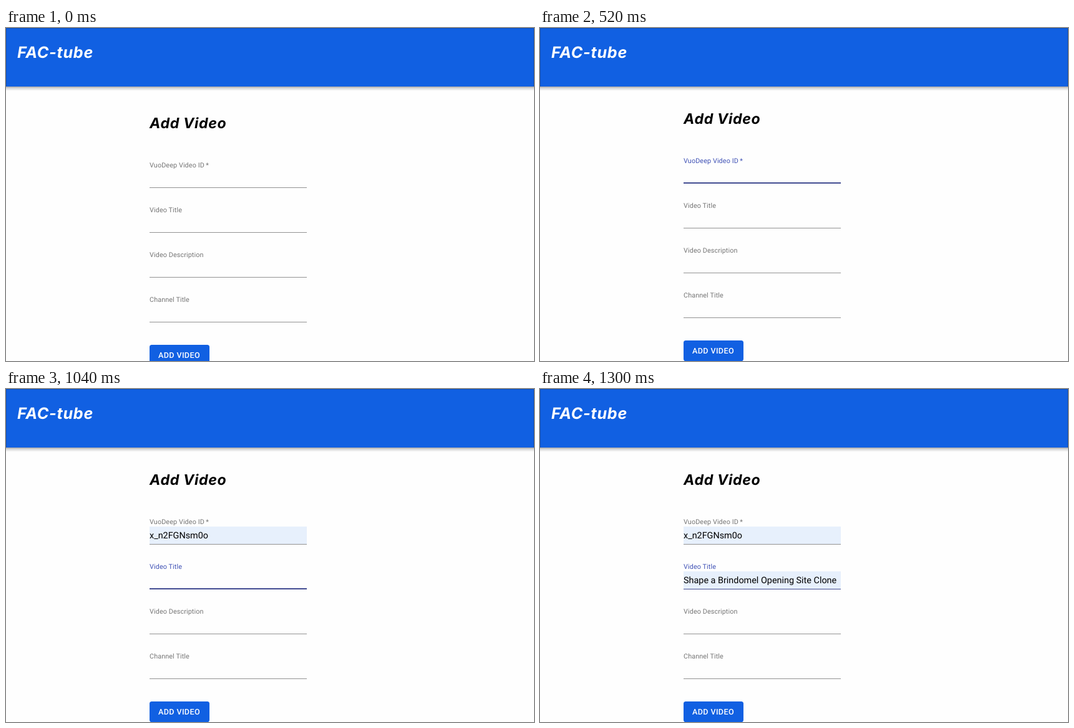
These frames come from a looping animation (846x535 px, 1.56 s). An HTML page:

```html
<!DOCTYPE html>
<html lang="en">
<head>
<meta charset="utf-8">
<title>Add Video</title>
<style>
  html, body { margin: 0; width: 100%; height: 100%; overflow: hidden; background: #fefefe; }
  svg { display: block; width: 846px; height: 535px; }
  text { font-family: Roboto, Arial, sans-serif; text-rendering: geometricPrecision; white-space: pre; }
  .heading { font-family: Montserrat, Inter, sans-serif; font-weight: 700; font-style: italic; }
  .label { font-size: 10.8px; letter-spacing: .1px; }
  .value { font-size: 14.4px; }
  .button { font-size: 12.6px; font-weight: 500; letter-spacing: .36px; fill: #fff; }
</style>
</head>
<body>
<svg viewBox="0 0 846 535">
  <defs>
    <linearGradient id="shade" x2="0" y2="1">
      <stop offset="0" stop-color="#000" stop-opacity=".36"/>
      <stop offset=".35" stop-color="#000" stop-opacity=".16"/>
      <stop offset="1" stop-color="#000" stop-opacity="0"/>
    </linearGradient>
  </defs>
  <rect width="846" height="535" fill="#fefefe"/>
  <g id="page">
    <text class="heading" x="230" y="161" font-size="23.2" letter-spacing=".65">Add Video</text>
    <g id="form"></g>
    <rect x="230" y="509" width="96" height="33" rx="3.6" fill="#1160e2"/>
    <text class="button" x="244" y="530">ADD VIDEO</text>
  </g>
  <rect y="94" width="846" height="7" fill="url(#shade)"/>
  <rect width="846" height="94" fill="#1160e2"/>
  <path d="M.5 94V.5H845.5V94" fill="none" stroke="#000" stroke-opacity=".2"/>
  <text class="heading" x="18" y="48" font-size="25.2" letter-spacing=".7" fill="#fff">FAC-tube</text>
</svg>
<script>
  const LOOP = 1560;
  const LEFT = 230, WIDTH = 252, PITCH = 72;
  const GREY = [117, 117, 117], BLUE = [63, 81, 181];
  const page = document.getElementById('page');
  const form = document.getElementById('form');

  function add(parent, tag, attrs, content = '') {
    const el = document.createElementNS('http://www.w3.org/2000/svg', tag);
    set(el, attrs);
    el.textContent = content;
    return parent.appendChild(el);
  }

  function set(el, attrs) {
    for (const key in attrs) el.setAttribute(key, attrs[key]);
  }

  function makeField(name, value, i) {
    const g = add(form, 'g', { transform: `translate(${LEFT} ${220 + i * PITCH})` });
    const label = add(g, 'text', { class: 'label', y: 4 }, name);
    add(g, 'rect', { y: 36, width: WIDTH, height: 1, fill: '#929292' });
    const rule = add(g, 'rect', { y: 35, height: 2, fill: '#414b91' });
    // The filled box covers the upper half of the focus rule.
    const fill = add(g, 'g', {});
    add(fill, 'rect', { y: 8, width: WIDTH, height: 28, fill: '#e7f0fc' });
    add(fill, 'text', { class: 'value', y: 27 }, value);
    return { label, rule, fill };
  }

  const fields = [
    ['VuoDeep Video ID\u2009*', 'x_n2FGNsm0o'],
    ['Video Title', 'Shape a Brindomel Opening Site Clone'],
    ['Video Description', ''],
    ['Channel Title', '']
  ].map(([name, value], i) => makeField(name, value, i));

  function showField({ label, rule, fill }, focus, filled) {
    const mix = GREY.map((c, k) => Math.round(c + (BLUE[k] - c) * focus));
    set(label, { fill: `rgb(${mix})` });
    set(rule, { x: WIDTH * (1 - focus) / 2, width: WIDTH * focus });
    set(fill, { visibility: filled ? 'visible' : 'hidden' });
  }

  function idFocus(t) {
    if (t < 520 || t >= 910) return 0;
    return t < 780 ? 1 : 0.425;
  }

  function draw(t) {
    set(page, { transform: `translate(0 ${t < 260 ? 0 : -7})` });
    showField(fields[0], idFocus(t), t >= 780);
    showField(fields[1], t >= 1040 ? 1 : 0, t >= 1300);
    showField(fields[2], 0, false);
    showField(fields[3], 0, false);
  }

  const start = performance.now();
  function tick() {
    draw((performance.now() - start) % LOOP);
    requestAnimationFrame(tick);
  }
  tick();
</script>
</body>
</html>
```
